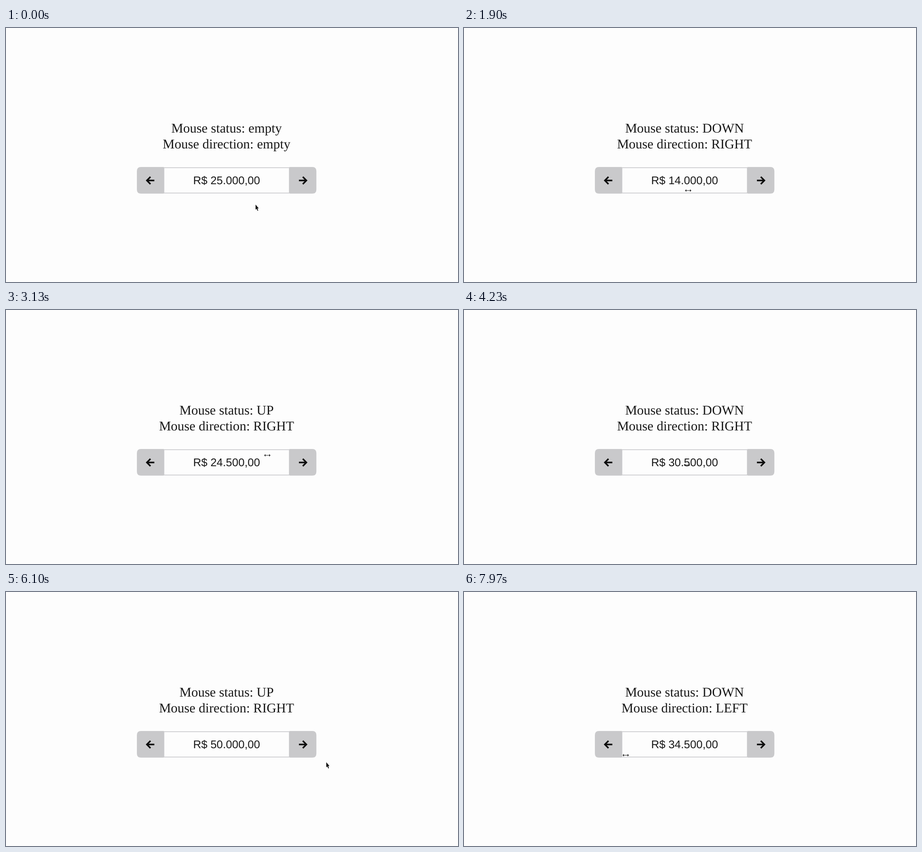
An HTML page that plays this animation: 998 by 561 pixels, repeating every 8 s.

```html
<!DOCTYPE html>
<html lang="en">
<head>
<meta charset="utf-8">
<title>Drag stepper</title>
<style>
html, body { margin: 0; width: 100%; height: 100%; overflow: hidden; background: #fdfdfd; }
svg { display: block; }
text { text-anchor: middle; text-rendering: geometricPrecision; fill: #181818; }
.label { font: 29.5px "Liberation Serif", "Times New Roman", serif; }
.value { font: 24.6px "Liberation Sans", Arial, sans-serif; }
.icon { fill: none; stroke: #0c0c0c; stroke-width: 3.4; }
</style>
</head>
<body>
<svg width="998" height="561" viewBox="0 0 998 561">
  <defs>
    <g id="button">
      <path fill="#c9c9cb" d="M298 307H347.500Q349.500 307 349.500 309V363.700Q349.500 365.700 347.500 365.700H298Q289 365.700 289 356.700V316Q289 307 298 307Z"/>
      <path class="icon" d="M327.500 336.700H312M319 328.700L311 336.700L319 344.700"/>
    </g>
  </defs>
  <text class="label" id="status" x="487" y="230.500"></text>
  <text class="label" id="direction" x="487" y="265.500"></text>
  <path d="M349 308.500H625M349 364.500H625" stroke="#c3c3c7" stroke-width="1.3"/>
  <use href="#button"/>
  <use href="#button" transform="translate(974.300 0) scale(-1 1)"/>
  <text class="value" id="value" x="487" y="345"></text>
  <path id="resize" fill="#222" d="M-7 0L-4-2.800V-.5H4V-2.800L7 0L4 2.800V.5H-4V2.800Z"/>
  <path id="pointer" fill="#111" stroke="#fff" stroke-width=".8" paint-order="stroke" d="M0 0V11.300L2.300 9.300L4.300 13.800L6 13L4.100 8.700L7 8.300Z"/>
</svg>
<script>
const FPS = 30, FRAMES = 240;
const RATE = 2 / 3; // thousands per frame while dragging
const MAX = 50;

// Mouse strokes: end frame, x, y, and whether the button is held on the way
const strokes = [
  [1, 551, 390],
  [6, 562, 347],
  [16, 560, 348],
  [34, 437, 351, true],
  [44.75, 395, 355, true],
  [57, 495, 359, true],
  [72.75, 600, 364, true],
  [80, 610, 425],
  [94, 577, 321],
  [107, 660, 388],
  [118, 400, 340],
  [138, 605, 345, true],
  [142.5, 400, 350],
  [154, 552, 354, true],
  [168, 744, 346, true],
  [190, 690, 390],
  [205, 392, 358],
  [210, 457, 356],
  [215.75, 545, 350],
  [FRAMES, 349, 361, true]
];

const $ = id => document.getElementById(id);

// Replays the strokes up to a frame
function stateAt(frame) {
  let [start, x, y] = [0, ...strokes[0].slice(1)];
  let amount = 25, status = "empty", direction = "empty";
  for (const [end, toX, toY, drag] of strokes) {
    if (start > frame) break;
    const part = Math.min(1, (frame - start) / (end - start));
    if (drag) {
      const sign = Math.sign(toX - x);
      amount = Math.min(MAX, amount + sign * RATE * part * (end - start));
      direction = sign < 0 ? "LEFT" : "RIGHT";
      status = "DOWN";
    } else if (status === "DOWN") {
      status = "UP";
    }
    x += (toX - x) * part;
    y += (toY - y) * part;
    start = end;
  }
  return { x, y, amount: Math.round(amount * 2) / 2, status, direction };
}

function draw(now) {
  const frame = Math.floor((now + 4) * FPS / 1000) % FRAMES;
  const { x, y, amount, status, direction } = stateAt(frame);
  const inside = x > 349 && x < 625 && y > 307 && y < 366;

  $("status").textContent = "Mouse status: " + status;
  $("direction").textContent = "Mouse direction: " + direction;
  $("value").textContent = `R$ ${Math.floor(amount)}.${amount % 1 ? "500" : "000"},00`;
  for (const [id, shown] of [["resize", inside], ["pointer", !inside]]) {
    $(id).setAttribute("transform", `translate(${x} ${y})`);
    $(id).setAttribute("visibility", shown ? "visible" : "hidden");
  }
  requestAnimationFrame(() => draw(performance.now() - begin));
}

const begin = performance.now();
draw(0);
</script>
</body>
</html>
```
